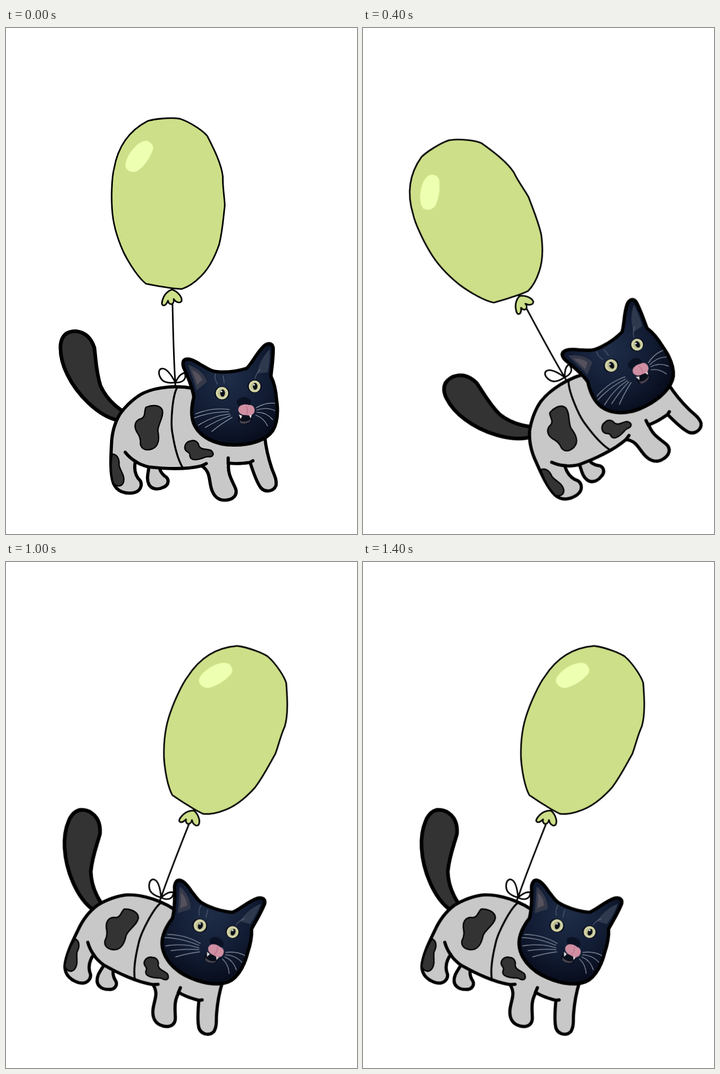
An HTML page without scripts that plays this animation: 624 by 898 pixels, repeating every 1.6 s.

```html
<!DOCTYPE html>
<html lang="en">
<head>
<meta charset="utf-8">
<title>Cat on a balloon</title>
<style>
html, body { margin: 0; width: 100%; height: 100%; overflow: hidden; background: #fff; }
svg { display: block; width: 100vw; height: 100vh; }
path { stroke-linecap: round; stroke-linejoin: round; }
.thin { fill: none; stroke: #000; stroke-width: 2.8; }
.balloon { fill: #cddf88; stroke: #000; stroke-width: 2.8; }
.dark { fill: #333; stroke: #000; stroke-width: 2.4; }
.fur { fill: #c8c8c8; stroke: #000; stroke-width: 5.7; }
.line { fill: none; stroke: #000; stroke-width: 5.7; }
.whisker { fill: none; stroke: #c3cad6; stroke-width: 1.2; opacity: .8; }
.swing {
  transform-origin: 331.4px 576.2px;
  animation: swing 1.6s step-end infinite;
}
@keyframes swing {
  0%, 50%, 100% { transform: none; }
  12.5%, 37.5% { transform: translate(13.2px, -9.8px) rotate(-12deg); }
  25% { transform: translate(30.2px, -17.3px) rotate(-27deg); }
  62.5%, 87.5% { transform: translate(-7.2px, -17.6px) rotate(22.9deg); }
  75% { transform: translate(-39.5px, -13.6px) rotate(49.7deg); }
}
</style>
</head>
<body>
<svg viewBox="0 0 624 898">
  <defs>
    <radialGradient id="coat" cx=".48" cy=".34" r=".68">
      <stop offset="0" stop-color="#1f2d47"/>
      <stop offset=".55" stop-color="#131e36"/>
      <stop offset="1" stop-color="#080d1d"/>
    </radialGradient>
    <path id="head" d="M316 590C322 584 335 590 345 597C358 604 364 609 375 610C395 612 415 608 428 604C438 595 446 575 460 563C468 558 475 560 475 570C475 590 472 605 471 618C477 630 480 645 481 660C484 680 483 700 474 715C462 732 435 740 405 740C370 740 345 725 335 705C328 690 330 670 334 655C332 640 322 615 316 603C314 597 314 593 316 590Z"/>
    <clipPath id="face"><use href="#head"/></clipPath>
    <g id="eye">
      <ellipse rx="13.5" ry="12" fill="#070c18"/>
      <circle r="11" fill="#d6d6a8"/>
      <circle r="7.5" fill="#bcc093"/>
      <ellipse cx="1" rx="4.2" ry="6.5" fill="#0a0e16"/>
      <circle cx="-1" cy="-3" r="1.5" fill="#fff"/>
    </g>
  </defs>

  <g class="swing">
    <g id="float">
      <path class="balloon" d="M252 165C262 162 290 158 309 161C330 168 352 184 358 192C368 212 383 240 385.500 264C385 282 388 296 389 315C386 340 385 360 379 384C370 410 358 430 345 442C335 452 322 460 313 463C300 464 275 459 249 454C236 444 220 420 209 398C199 376 190 350 188.500 320C187 300 188 265 192 250C198 215 215 184 252 165Z"/>
      <path fill="#edffb0" d="M236 205C245 199 252 199 256 203C264 208 262 216 259 221C253 236 244 246 235 253C226 258 217 255 213 248C210 238 220 217 236 205Z"/>
      <path class="balloon" d="M295 464C288 467 283 471 280 478C277 485 276 491 279 492C284 494 287 486 288 484C288 487 291 491 295 490C298 488 299 484 298 481C302 487 309 489 312 485C314 478 306 468 295 464Z"/>
      <path class="thin" d="M296 490C297 530 298 590 301 629C292 612 283 602 275 605C268 610 274 625 283 628C290 631 297 629 301 629C308 616 312 613 318 612C322 625 312 630 301 629V638"/>
    </g>

    <g id="body">
      <path class="dark" style="stroke-width:6.5" d="M198 696C163 688 126 650 109 615C100 597 96 578 97 562C99 546 108 538 124 538C142 540 152 552 157 567C160 590 160 610 168 635C177 655 190 668 206 679"/>
      <path class="fur" d="M254 779C253 790 249 800 254 810C259 819 270 820 280 815C290 811 291 800 282 795C276 790 274 786 273 781"/>
      <path class="fur" d="M335 640C305 634 270 636 244 648C230 655 213 670 202 686C192 703 188 720 187.500 740C186 765 185 790 191 808C197 823 212 827 226 825C238 823 243 813 239 804C230 795 227 783 230 769C237 774 245 777 254 779C280 782 320 784 348 777C360 785 361 795 363 808C366 828 375 838 388 838C405 838 412 828 408 817C402 803 393 790 396 772C408 774 420 773 434 771C440 790 447 808 453 816C460 824 475 824 480 812C482 800 475 790 472 780C467 765 462 745 460 725L440 700Z"/>
      <path class="line" d="M212 753Q220 763 230 769M395 763V773M434 771L439 768M348 777L356 773"/>
      <path class="dark" d="M189 756C198 757 202 765 201 776C203 786 212 794 209 806C206 814 198 815 191 808C186 790 186 770 189 756Z"/>
      <path class="dark" d="M249 673C261 668 274 669 278 678C281 690 270 703 270 715C273 730 272 742 260 747C248 751 241 747 239 739C240 728 236 722 232 716C227 706 229 696 241 693C249 689 245 679 249 673Z"/>
      <path class="dark" d="M328 733C336 730 342 735 343 742C349 750 358 746 365 750C371 756 368 761 361 761C352 760 348 766 338 766C330 767 326 763 327 757C326 752 319 753 318 746C317 739 322 734 328 733Z"/>
      <path class="thin" style="stroke-width:3.4" d="M305 637C296 650 292 700 296 720C300 745 305 765 314 780"/>
    </g>

    <g id="cat-head">
      <use href="#head" fill="url(#coat)"/>
      <g clip-path="url(#face)">
        <path fill="#34394a" d="M324 598C338 602 354 614 357 628L339 643C334 625 328 612 324 598Z"/>
        <path fill="#6b626a" opacity=".6" d="M330 607Q344 612 349 624L340 633Q336 620 330 607Z"/>
        <path fill="#2f394e" d="M469 570C458 581 449 596 447 613L465 611Q470 590 469 570Z"/>
        <ellipse cx="423" cy="664" rx="13" ry="9" fill="#0b1224"/>
        <ellipse cx="425" cy="694" rx="13" ry="9" fill="#0a0f1c"/>
        <path fill="#4a4450" d="M415 696Q425 702 436 694L433 699Q425 704 417 701Z"/>
        <path fill="#e4e0dc" d="M414 686L420 688L417 694ZM432 687L437 686L435 693Z"/>
        <path fill="#d08fa3" d="M413 676C415 668 425 667 432 669C440 668 444 676 441 683C436 690 430 687 425 687C418 687 412 682 413 676Z"/>
        <path fill="none" stroke="#b8708a" stroke-width="1.4" d="M427 671Q431 678 428 685"/>
        <use href="#eye" x="384" y="648"/>
        <use href="#eye" transform="translate(442 636) scale(.95)"/>
        <path class="whisker" d="M397 677Q365 673 337 685M396 681Q362 681 335 692M398 685Q368 688 342 705M399 688Q376 696 354 709M402 691Q380 704 366 716M445 674Q462 664 479 666M446 678Q463 672 478 679M446 682Q463 682 474 695M444 687Q458 692 465 706"/>
        <path class="whisker" style="opacity:.35" d="M376 632Q370 622 372 614M388 630L386 617M443 622Q445 612 452 606"/>
      </g>
      <use href="#head" fill="none" stroke="#000" stroke-width="6" stroke-linejoin="round"/>
    </g>
  </g>
</svg>
</body>
</html>
```
